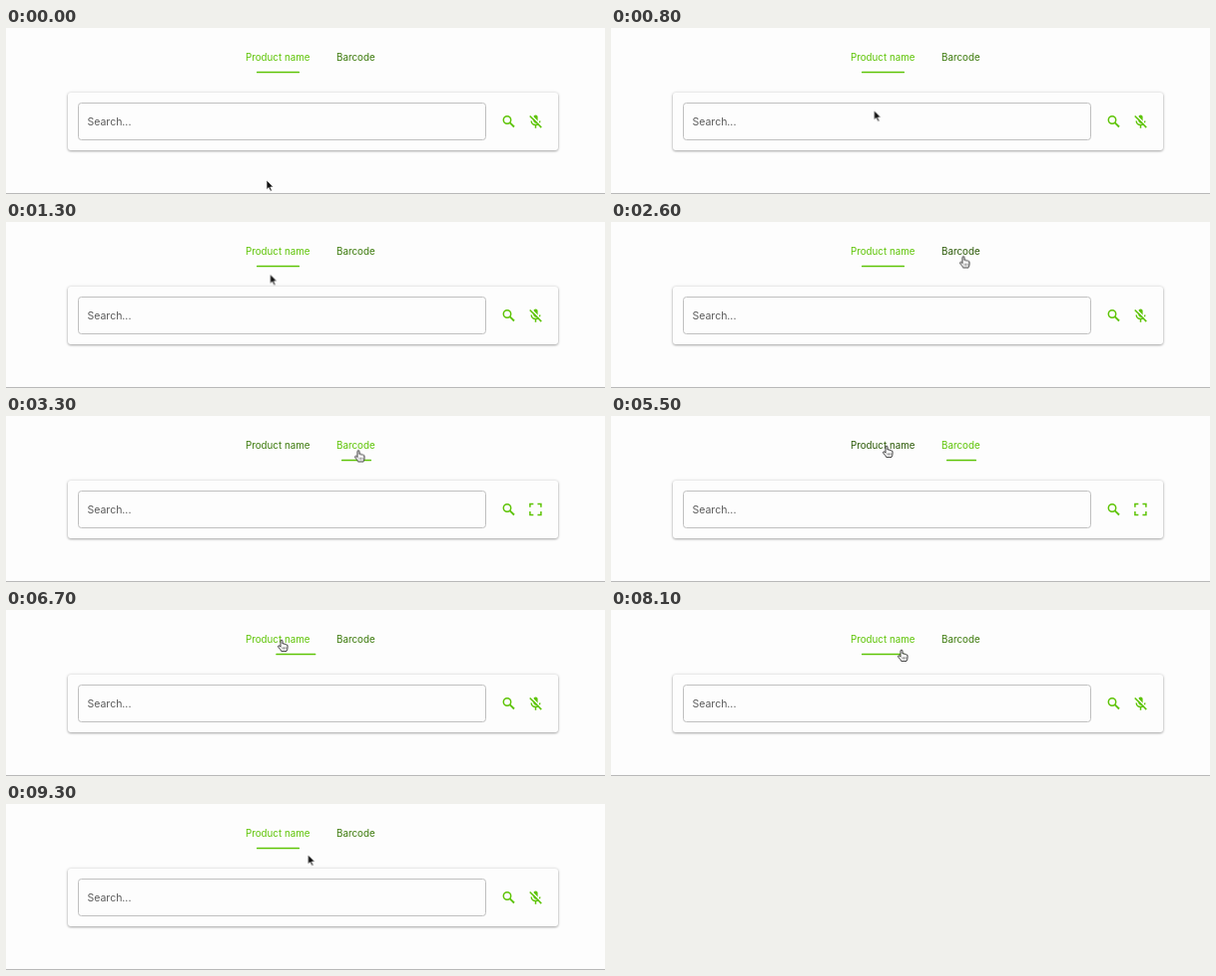
These frames come from a looping animation (600x167 px, 9.8 s). An HTML page:

```html
<!DOCTYPE html>
<html lang="en">
<head>
<meta charset="utf-8">
<title>Product search</title>
<style>
  :root { --active: #5ec406; --idle: #3c7a0c; --hover: #2c5a08; --paper: #fdfdfd; }
  html, body { margin: 0; width: 100%; height: 100%; overflow: hidden; background: var(--paper); }
  svg { display: block; font-family: Inter, Roboto, sans-serif; }

  .card { fill: var(--paper); filter: drop-shadow(0 1px 1px rgba(0,0,0,.28)) drop-shadow(0 0 1.5px rgba(0,0,0,.16)); }
  .field { fill: none; stroke: #c0c0c0; }
  .rule { fill: #b9b9b9; }
  .hint { font-size: 10.5px; fill: #5c5c5c; }
  .tab { font-size: 9.8px; text-anchor: middle; }
  .bar { fill: var(--active); }
  .icon { fill: none; stroke: var(--active); stroke-width: 1.5; }
  .icon .body { fill: var(--active); stroke: none; }
  .icon .gap { stroke: var(--paper); }
  .hand { stroke: #222; stroke-width: .9; stroke-linejoin: round; fill: #fff; }
  .arrow { fill: #111; stroke: #fff; stroke-width: .7; }

  /* One loop for everything; swaps are hard, the pointer and bar glide */
  .name, .code, .mic, .scan, .hand, .arrow { animation: 9.8s step-end infinite; }
  .cursor, .bar { animation: 9.8s ease-in-out infinite; }
  .name { animation-name: name; }
  .code { animation-name: code; }
  .mic { animation-name: mic; }
  .scan { animation-name: scan; }
  .hand { animation-name: hand; }
  .arrow { animation-name: arrow; }
  .bar { animation-name: slide; }
  .cursor { animation-name: move; }

  @keyframes name {
    0%, 67.3% { fill: var(--active); }
    30.6% { fill: var(--idle); }
    48.5% { fill: var(--hover); }
  }
  @keyframes code {
    0%, 67.3% { fill: var(--idle); }
    23% { fill: var(--hover); }
    30.6% { fill: var(--active); }
  }
  @keyframes mic { 0%, 67.3% { visibility: visible; } 30.6% { visibility: hidden; } }
  @keyframes scan { 0%, 67.3% { visibility: hidden; } 30.6% { visibility: visible; } }
  @keyframes hand { 0%, 93% { visibility: hidden; } 14.2% { visibility: visible; } }
  @keyframes arrow { 0%, 93% { visibility: visible; } 14.2% { visibility: hidden; } }
  @keyframes slide {
    0%, 29.6%, 69.4%, 100% { x: 251px; width: 43px; }
    32.6%, 66.3% { x: 336px; width: 30px; }
  }
  @keyframes move {
    0% { transform: translate(261px, 153px); }
    13.2% { transform: translate(264.5px, 52.5px); }
    16.3%, 18.4%, 56.1%, 79.6% { transform: translate(276px, 30px); }
    26.5%, 40.8% { transform: translate(353px, 34.5px); }
    82.6%, 90.8% { transform: translate(291px, 40px); }
    94.9%, 100% { transform: translate(302.5px, 51px); }
  }
</style>
</head>
<body>
<svg width="600" height="167" viewBox="0 0 600 167">
  <rect class="rule" y="166" width="600" height="1"/>
  <text class="tab name" x="272.2" y="33">Product name</text>
  <text class="tab code" x="350.4" y="33">Barcode</text>
  <rect class="bar" x="251" y="43.8" width="43" height="1.5" rx=".5"/>

  <rect class="card" x="62" y="65" width="491" height="58" rx="3"/>
  <rect class="field" x="72.5" y="75.5" width="408" height="37" rx="3"/>
  <text class="hint" x="81.5" y="97.5">Search...</text>

  <g class="icon">
    <circle cx="502" cy="92.5" r="3.7"/>
    <path d="M504.8 95.3L509 99.5" stroke-width="1.9"/>
  </g>
  <g class="icon mic">
    <rect class="body" x="528.4" y="87.4" width="4.2" height="8.3" rx="2.1"/>
    <path d="M526.2 93.6a4.3 4 0 0 0 8.6 0M530.5 97.5v3.2"/>
    <path class="gap" d="M525.9 87.7l11 11"/>
    <path d="M524.7 88.5l11.6 11.6"/>
  </g>
  <rect class="icon scan" x="524.9" y="88.4" width="11" height="11" stroke-dasharray="6.9 4.1" stroke-dashoffset="3.45"/>

  <g class="cursor">
    <path class="arrow" d="M0 0V9.6L2.2 7.6 3.8 11.2 5.4 10.5 3.8 7H6.8Z"/>
    <g class="hand">
      <path d="M-1 1C-1-.2 1-.2 1 1V4Q2.4 3.2 2.9 4.4 4.2 3.8 4.6 4.9 6 4.6 6 6V8Q6 9.5 5 11.4H-.3Q-.8 9.8-3.3 7.2C-4 6-2.6 5.4-1.9 6.2L-1 7.2Z"/>
      <path d="M1 7.4v2M2.6 7.4v2M4.2 7.4v2" stroke-width=".6"/>
    </g>
  </g>
</svg>
</body>
</html>
```
